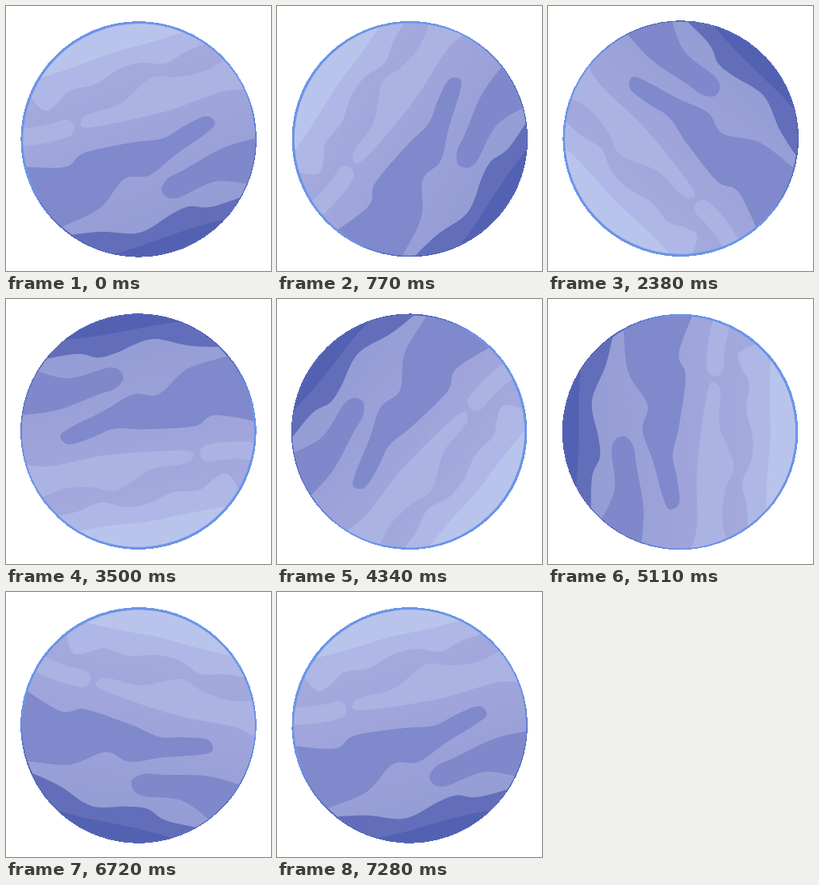
An HTML page that plays this animation: 332x332 px, repeating every 7350 ms.

```html
<!DOCTYPE html>
<html lang="en">
<head>
<meta charset="utf-8">
<title>Turning planet</title>
<style>
html, body { margin: 0; width: 100%; height: 100%; overflow: hidden; background: #fff; }
svg { display: block; width: 100vw; height: 100vh; }
</style>
</head>
<body>
<svg viewBox="0 0 332 332">
  <defs>
    <clipPath id="disc"><circle cx="166.9" cy="167.9" r="145.6"/></clipPath>
    <linearGradient id="rim" x1=".3" y1="0" x2=".7" y2="1">
      <stop offset=".5" stop-color="#6b95e8"/>
      <stop offset=".8" stop-color="#4a5cb2"/>
    </linearGradient>
    <linearGradient id="base" x1=".35" y1=".2" x2=".6" y2=".85">
      <stop offset="0" stop-color="#a5abde"/>
      <stop offset=".5" stop-color="#9ea4da"/>
      <stop offset="1" stop-color="#939cd4"/>
    </linearGradient>
  </defs>
  <g id="planet">
    <circle cx="166.2" cy="166.9" r="147.8" fill="url(#rim)" shape-rendering="crispEdges"/>
    <g id="bands" clip-path="url(#disc)">
      <rect width="332" height="332" fill="url(#base)"/>
      <path d="M0 165Q45 165 75 153" fill="none" stroke="#abb3e3" stroke-width="22" stroke-linecap="round"/>
    </g>
  </g>
</svg>
<script>
const STEP = 70, STEPS = 105;
const NORTH = 'L166 -200', SOUTH = 'L200 600';
const planet = document.getElementById('planet');
const bands = document.getElementById('bands');

// Smooth open curve through a few key points
function curve(points) {
  const p = points.split(' ').map(s => s.split(',').map(Number));
  const at = i => p[Math.max(0, Math.min(i, p.length - 1))];
  let d = 'M' + p[0];
  for (let i = 0; i < p.length - 1; i++) {
    const [a, b, c, e] = [at(i - 1), at(i), at(i + 1), at(i + 2)];
    const c1 = b.map((v, k) => v + (c[k] - a[k]) / 6);
    const c2 = c.map((v, k) => v - (e[k] - b[k]) / 6);
    d += `C${c1} ${c2} ${c}`;
  }
  return d;
}

// A band is closed outside the disc, around a pole if it is a cap
function band(fill, edge, pole = '') {
  const path = document.createElementNS('http://www.w3.org/2000/svg', 'path');
  path.setAttribute('d', curve(edge) + pole + 'Z');
  path.setAttribute('fill', fill);
  bands.append(path);
}

band('#aeb7e5', '15,95 46,130 64,122 80,106 112,98 140,80 168,71 200,72 230,55 285,35', NORTH);
band('#b9c4ec', '20,98 84,77 135,58 180,46 235,28', NORTH);
band('#abb3e3', '295,52 252,80 214,89 182,90 144,122 108,134 95,142 105,152 200,132 276,106 330,108');
band('#7f89cc', '0,200 72,202 98,184 158,171 196,166 222,151 250,138 262,147 250,160 213,186 180,212 148,217 118,253 72,276 40,290');
band('#7e88cb', '325,163 274,177 225,204 203,216 195,232 213,241 262,220 310,224');
band('#636eba', '45,292 115,283 167,284 207,261 230,251 260,251 325,228', SOUTH);
band('#5361b2', '110,316 155,305 190,293 240,276 320,255', SOUTH);

function draw(now) {
  const step = Math.floor(now / STEP) % STEPS;
  planet.setAttribute('transform', `rotate(${-360 * step / STEPS} 166 166.5)`);
  requestAnimationFrame(draw);
}
draw(0);
</script>
</body>
</html>
```
